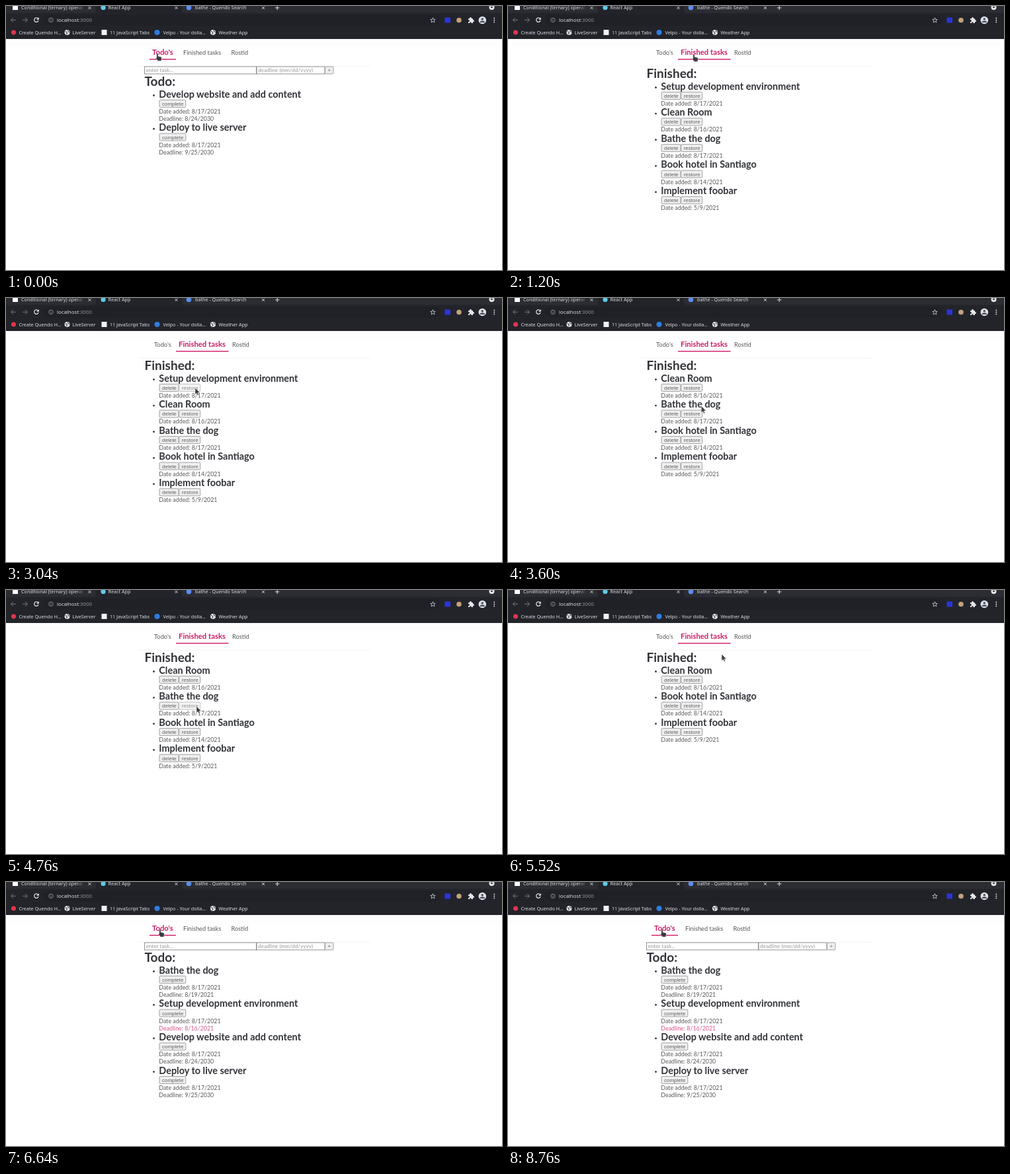
Write an HTML page that moves like this. It is 750 px wide and 400 px high and loops after 9.4 s.

```html
<!DOCTYPE html>
<html lang="en">
<head>
<meta charset="utf-8">
<title>Todo app</title>
<style>
  html, body { margin: 0; width: 100%; height: 100%; overflow: hidden; background: #fff; }
  svg { display: block; width: 750px; height: 400px; }
  text { font: 8.85px Lato, sans-serif; fill: #56585c; white-space: pre; }
  .ui { font: 7.2px "Noto Sans", sans-serif; fill: #dcdee2; }
  .url { font-size: 7.8px; }
  .dim { fill: #8d9197; }
  .h1 { font-size: 19px; font-weight: 700; fill: #313338; }
  .h2 { font-size: 14.45px; font-weight: 700; fill: #313338; }
  .link { font-size: 9.3px; }
  .active { font-size: 11.3px; font-weight: 700; }
  .pink { fill: #d8538c; }
  .active { fill: #cf1b66; }
  .hint { font-size: 8.2px; fill: #979797; }
  .btn { font: 8px "Liberation Sans", Arial, sans-serif; fill: #606060; }
  .pressed { fill: #8a8a8a; }
  .line { fill: none; stroke: #dcdee2; stroke-width: 1; }
</style>
</head>
<body>
<svg viewBox="0 0 750 400">
  <g id="browser"></g>
  <g id="page"></g>
  <path id="cursor" fill="#3a3c42" stroke="#fff" stroke-width=".5"/>
</svg>
<script>
const LOOP = 9400;
const PINK = '#cf1b66', BAR = '#22242a', STRIP = '#2b2d32';
const $ = id => document.getElementById(id);
const text = (x, y, str, cls = '') => `<text x="${x}" y="${y}" class="${cls}">${str}</text>`;
const rect = (x, y, w, h, fill, more = '') =>
  `<rect x="${x}" y="${y}" width="${w}" height="${h}" fill="${fill}" ${more}/>`;
const dot = (x, y, r, fill) => `<circle cx="${x}" cy="${y}" r="${r}" fill="${fill}"/>`;
const line = (d, more = '') => `<path class="line" d="${d}" ${more}/>`;
const ui = (x, y, str) => text(x, y, str, 'ui');

function drawBrowser() {
  const close = x => line(`M${x - 2} .8l4 4m0-4l-4 4`);
  const globe = x => dot(x, 40, 4, '#e4e6e9') +
    line(`M${x - 3} 38.5l3 1.5l-1 3M${x + 1} 36.5l.5 2l2 1`, `style="stroke:${BAR}"`);
  return rect(0, 0, 750, 11, STRIP) +
    `<path d="M131 11Q136 11 136 6V0H266V6Q266 11 271 11Z" fill="${BAR}"/>` +
    rect(0, 10.5, 750, 39.5, BAR) +
    rect(56, 13, 600, 16.5, '#202126', 'rx="8.2"') +
    // tabs
    rect(10, -2, 8, 8, '#fff') + ui(23, 5, 'Conditional (ternary) operat') +
    rect(107, 0, 11, 8, 'url(#fade)') +
    `<linearGradient id="fade"><stop stop-color="${STRIP}" stop-opacity="0"/><stop offset="1" stop-color="${STRIP}"/></linearGradient>` +
    dot(147, 2.5, 3.6, '#61c9e8') + ui(154.5, 5, 'React App') +
    dot(276.5, 2.5, 3.8, '#5b8def') + ui(286, 5, 'bathe - Quendo Search') +
    [126.5, 257.5, 389].map(close).join('') + line('M407 2.8h6.4M410.2 -.4v6.4') +
    dot(734.5, 2, 4, '#e4e6e9') + `<path d="M732.5 1h4l-2 2.6z" fill="${BAR}"/>` +
    // toolbar
    line('M15 21.3H7.5m3.5-3.5l-3.5 3.5l3.5 3.5M25 21.3h7.5m-3.5-3.5l3.5 3.5l-3.5 3.5', 'style="stroke:#74777d"') +
    line('M48.6 19.3A3.2 3.2 0 1 0 49 22', 'style="stroke-width:1.3"') +
    '<path d="M49.8 17.2v3.6h-3.6z" fill="#e4e6e9"/>' +
    line('M64.8 21.3a3.2 3.2 0 1 0 6.4 0a3.2 3.2 0 1 0-6.4 0M68 20.8v2.3M68 19v.9', 'style="stroke:#9aa0a6;stroke-width:.8"') +
    text(77, 24, 'localhost<tspan class="dim">:3000</tspan>', 'ui url') +
    line('M645.5 17.8l1 2.5l2.7.2l-2.1 1.8l.7 2.7l-2.3-1.5l-2.3 1.5l.7-2.7l-2.1-1.8l2.7-.2z', 'style="stroke-width:.8"') +
    rect(663.5, 17.5, 8.5, 8, '#2b34d9') + dot(685, 21.5, 3.8, '#c3a27c') +
    '<path d="M699 19h2.2a1.4 1.4 0 1 1 2.6 0H706v2.3a1.4 1.4 0 1 1 0 2.6V26h-2.4a1.3 1.3 0 1 0-2.5 0H699v-2.3a1.3 1.3 0 1 0 0-2.4z" fill="#e4e6e9"/>' +
    dot(720.3, 21.5, 5.8, '#dfe3ea') + dot(720.3, 19.7, 1.8, '#4b5260') +
    '<path d="M716.5 25q0-2.8 3.8-2.8t3.8 2.8z" fill="#4b5260"/>' +
    [18.5, 21.5, 24.5].map(y => dot(738.3, y, .9, '#e4e6e9')).join('') +
    // bookmarks
    dot(11.5, 40, 3.6, '#e0344c') + ui(19.5, 42.6, 'Create Quendo H...') +
    globe(92.5) + ui(100.5, 42.6, 'LiveServer') +
    rect(144.5, 36, 8, 8, '#f1f1f1') + ui(157, 42.6, '11 JavaScript Tabs') +
    dot(228.5, 40, 4, '#2f7de0') + ui(237.5, 42.6, 'Velpo - Your dolla...') +
    globe(313) + ui(321.5, 42.6, 'Weather App');
}

const todos = {
  bathe: ['Bathe the dog', '8/17/2021', '8/19/2021'],
  setup: ['Setup development environment', '8/17/2021', '8/16/2021', 'pink'],
  site: ['Develop website and add content', '8/17/2021', '8/24/2030'],
  deploy: ['Deploy to live server', '8/17/2021', '9/25/2030'],
  room: ['Clean Room', '8/16/2021'],
  hotel: ['Book hotel in Santiago', '8/14/2021'],
  foobar: ['Implement foobar', '5/9/2021']
};

function button(x, y, w, label, state = '') {
  const fill = { hover: '#e5e5e5', pressed: '#f5f5f5' }[state] || '#efefef';
  return rect(x, y, w, 11, fill, `rx="1.3" stroke="${state == 'pressed' ? '#b4b4b4' : '#8c8c8c'}" stroke-width=".8"`) +
    text(x + 4, y + 8.4, label, 'btn ' + state);
}

function nav(finished, hover) {
  const link = (x, label, on, hot) => text(x, on ? 73.9 : 73.5, label, on ? 'active' : hot ? 'link pink' : 'link');
  return rect(0, 50, 750, 13, '#fdfdfd') + rect(200, 90.6, 351, .8, '#f1f1f1') +
    link(finished ? 224 : 221, "Todo's", !finished, hover == 'todo') +
    link(finished ? 261 : 268, 'Finished tasks', finished, hover == 'finished') +
    link(finished ? 342 : 340.5, 'Rostid', false) +
    (finished ? rect(257, 80, 79.5, 1.4, PINK) : rect(217, 80, 40, 1.4, PINK));
}

const heading = (y, name) => dot(223.5, y - 3, 1.4, '#313338') + text(231.3, y, name, 'h2');

function todoPage(keys) {
  const field = (x, w, hint) => rect(x, 91.9, w, 11, '#fff', 'stroke="#858585" stroke-width=".9"') +
    text(x + 2, 100.2, hint, 'hint');
  return field(209.5, 169, 'enter task...') + field(379, 103, 'deadline (mm/dd/yyyy)') +
    button(482.5, 91.9, 12.5, '+') + text(209.5, 121.4, 'Todo:', 'h1') +
    keys.map((key, i) => {
      const [name, added, due, cls] = todos[key], y = 138.5 + i * 50.7;
      return heading(y, name) + button(232, y + 3.9, 39.8, 'complete') +
        text(231.3, y + 24.3, 'Date added: ' + added) + text(231.3, y + 35.3, 'Deadline: ' + due, cls);
    }).join('');
}

function finishedPage(keys, hot, state) {
  return text(209.5, 109.2, 'Finished:', 'h1') + keys.map((key, i) => {
    const [name, added] = todos[key], y = 126.5 + i * 39.6;
    const look = b => hot == b + i ? state : '';
    return heading(y, name) + button(232, y + 3.9, 29, 'delete', look('delete')) +
      button(261.7, y + 3.9, 32, 'restore', look('restore')) +
      text(231.3, y + 24.3, 'Date added: ' + added);
  }).join('');
}

// Cursor strokes: start, end, target, control point
const moves = [
  [40, 520, 279, 72, 250, 96],
  [1280, 2120, 312, 148, 325, 100],
  [2160, 2520, 286, 136, 300, 150],
  [3360, 4000, 288, 176, 300, 190],
  [4960, 5320, 318, 82, 320, 130],
  [5320, 5680, 296, 113, 344, 91],
  [5720, 6240, 231, 71, 265, 100]
];

function cursorAt(t) {
  let x = 227, y = 71;
  for (const [start, end, tx, ty, cx, cy] of moves) {
    if (t < start) break;
    const p = Math.min(1, (t - start) / (end - start)), u = p * p * (3 - 2 * p), v = 1 - u;
    x = v * v * x + 2 * u * v * cx + u * u * tx;
    y = v * v * y + 2 * u * v * cy + u * u * ty;
  }
  return [x, y];
}

const ARROW = 'M0 0V10.2L2.3 8.2L3.8 11.5L5.5 10.7L4 7.6H7.2Z';
const HAND = 'M1.8 .6Q3.1 .6 3.1 1.9V5.1L7.1 5.9Q8.7 6.3 8.4 7.8L7.7 12.3H2.6L-.5 8.2Q-.2 7 .7 7.4V1.9Q.7 .6 1.8 .6Z';
const within = (v, from, to) => v >= from && v <= to;

let shown;
function draw(t) {
  const [x, y] = cursorAt(t);
  const finished = within(t, 1200, 6519.9);
  const link = !within(y, 60, 81) ? '' : within(x, 217, 257) ? 'todo' :
    within(x, finished ? 258 : 264, finished ? 336 : 329) ? 'finished' : '';
  const row = Math.floor((y - 130) / 39.6);
  const hot = row >= 0 && (y - 130) % 39.6 < 12 ?
    within(x, 232, 261) ? 'delete' + row : within(x, 261.7, 294) ? 'restore' + row : '' : '';
  const state = within(t, 2920, 3119) || within(t, 4760, 4919) ? 'pressed' : 'hover';

  const keys = !finished ? (t < 1200 ? [] : ['bathe', 'setup']).concat('site', 'deploy') :
    ['setup', 'room', 'bathe', 'hotel', 'foobar'].filter(k =>
      !(k == 'setup' && t >= 3120) && !(k == 'bathe' && t >= 4920));
  const html = nav(finished, link) + (finished ? finishedPage(keys, hot, state) : todoPage(keys));
  if (html != shown) $('page').innerHTML = shown = html;
  $('cursor').setAttribute('d', link ? HAND : ARROW);
  $('cursor').setAttribute('transform', `translate(${x} ${y})`);
}

$('browser').innerHTML = drawBrowser();
const begin = performance.now();
function tick() {
  draw((performance.now() - begin) % LOOP);
  requestAnimationFrame(tick);
}
tick();
</script>
</body>
</html>
```
